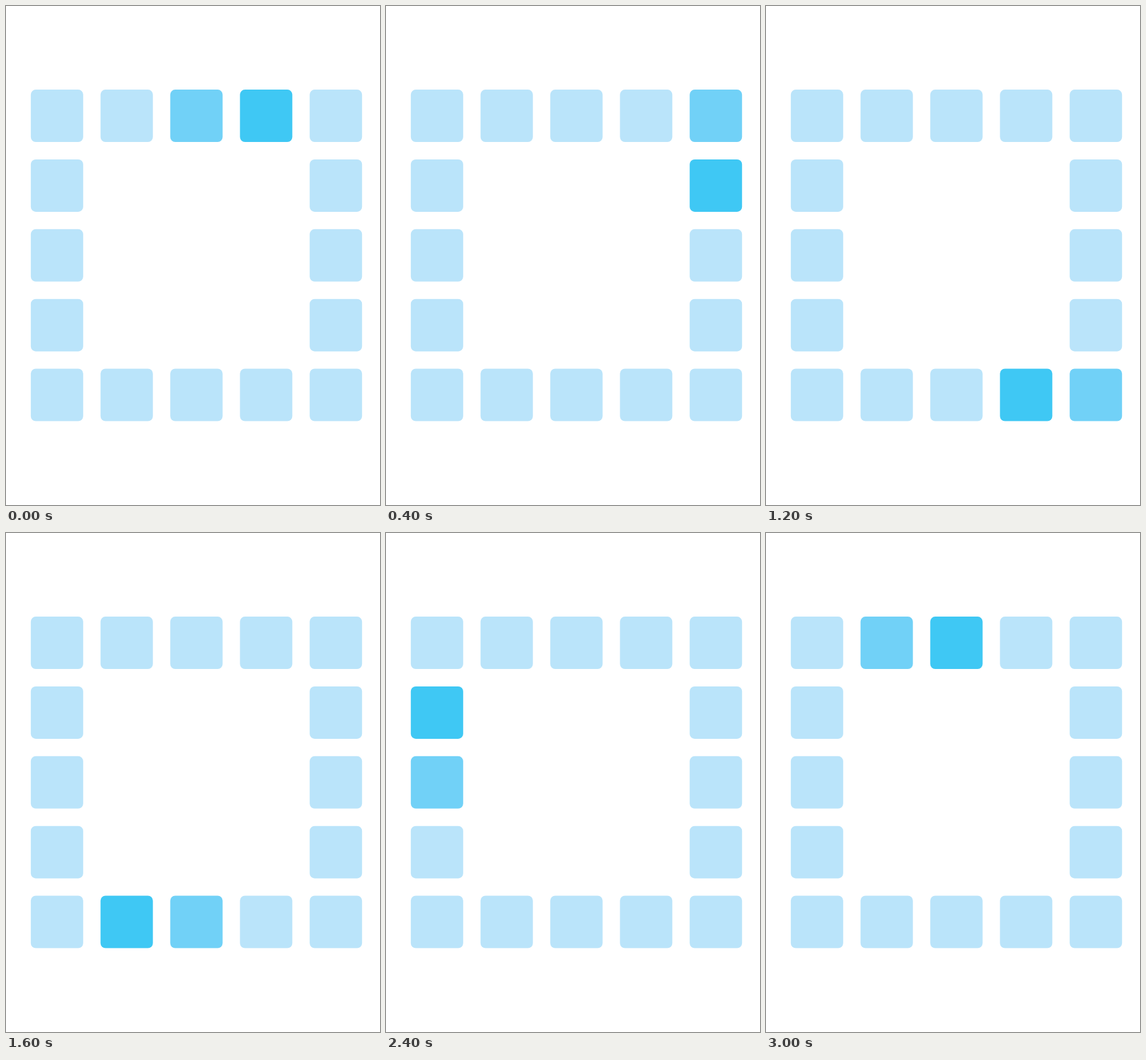
An HTML page that plays this animation: 600 px wide and 800 px high, repeating every 3.2 s.

```html
<!DOCTYPE html>
<html>
<head>
<meta charset="utf-8">
<style>
  html, body { margin: 0; width: 100%; height: 100%; overflow: hidden; background: #fff; }
  svg { display: block; }
</style>
</head>
<body>
<svg width="600" height="800"></svg>
<script>
const COUNT = 16, STEP = 200, PITCH = 111.85, SIZE = 84;
const REST = '#bae4fa', TAIL = '#71d1f7', HEAD = '#3fc8f4';
const svg = document.querySelector('svg');

// Clockwise around a 5 by 5 ring, starting at the top left.
const tiles = Array.from({ length: COUNT }, (_, i) => {
  const side = i >> 2, k = i % 4;
  const col = [k, 4, 4 - k, 0][side];
  const row = [0, k, 4, 4 - k][side];
  const rect = document.createElementNS('http://www.w3.org/2000/svg', 'rect');
  const attrs = { x: 39.8 + col * PITCH, y: 134.1 + row * PITCH, width: SIZE, height: SIZE, rx: 8 };
  for (const name in attrs) rect.setAttribute(name, attrs[name]);
  return svg.appendChild(rect);
});

function draw(time) {
  const head = (3 + Math.floor(time / STEP)) % COUNT;
  tiles.forEach((tile, i) => {
    const behind = (head - i + COUNT) % COUNT;
    tile.setAttribute('fill', [HEAD, TAIL][behind] || REST);
  });
}

const start = performance.now();
function tick() {
  draw(performance.now() - start);
  requestAnimationFrame(tick);
}
tick();
</script>
</body>
</html>
```
